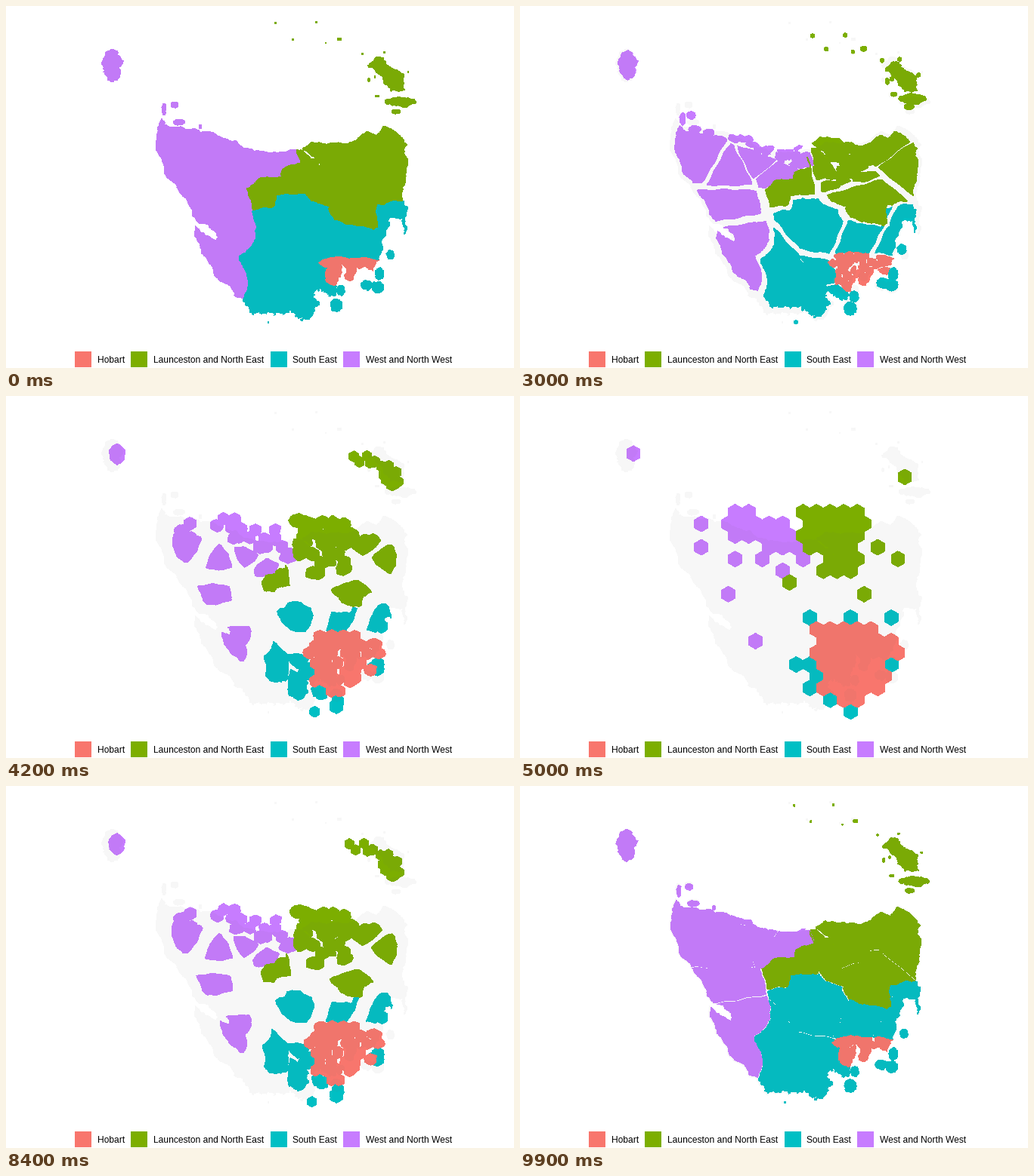
A matplotlib script for the animation above (10 s loop, 672 px wide and 480 px high).

```python
import numpy as np
import matplotlib.pyplot as plt
from matplotlib.animation import FuncAnimation
from matplotlib.patches import PathPatch, Rectangle
from matplotlib.path import Path

W, H, DPI = 672, 480, 96
STEP = 17.95                    # hexagon width
ROW = STEP * np.sqrt(3) / 2
RED, GREEN, TEAL, PURPLE = range(4)
LEGEND = [("Hobart", "#F8766D", 91, 121),
          ("Launceston and North East", "#7CAE00", 165, 195),
          ("South East", "#00BFC4", 350, 379),
          ("West and North West", "#C77CFF", 446, 476)]

rng = np.random.default_rng(11)


def fray(a, b, amp):
    """Ragged line from a up to, not including, b."""
    d = b - a
    size = np.hypot(*d)
    if size < 2.5:
        return [a]
    side = np.array([-d[1], d[0]]) / size
    mid = (a + b) / 2 + side * rng.normal() * min(.13 * size, 1.3) * amp
    return fray(a, mid, amp) + fray(mid, b, amp)


def rough(points, amp=.8):
    pts = np.array(points, float)
    line = [q for a, b in zip(pts, pts[1:]) for q in fray(a, b, amp)]
    return np.array(line + [pts[-1]])


def ring(*lines):
    return np.vstack([p[:-1] for p in lines])


def area(p):
    x, y = p.T
    return (x * np.roll(y, -1) - y * np.roll(x, -1)).sum() / 2


def clip(p, point, normal):
    """Part of p on the side of the line that normal points away from."""
    side = (p - point) @ normal
    out = []
    for i in range(len(p)):
        j = (i + 1) % len(p)
        if side[i] <= 0:
            out.append(p[i])
        if side[i] * side[j] < 0:
            out.append(p[i] + (p[j] - p[i]) * side[i] / (side[i] - side[j]))
    return np.array(out).reshape(-1, 2)


def cut(p, x1, y1, x2, y2):
    """Parts of p to the left and to the right of a directed line."""
    normal = np.array([y1 - y2, x2 - x1])
    return clip(p, (x1, y1), normal), clip(p, (x1, y1), -normal)


def densify(p, count=78):
    nxt = np.roll(p, -1, axis=0)
    sizes = np.hypot(*(nxt - p).T)
    limit = sizes.sum() / count
    out = []
    for a, b, size in zip(p, nxt, sizes):
        n = max(1, int(np.ceil(size / limit)))
        out += [a + (b - a) * i / n for i in range(n)]
    return np.array(out)


def hex_centre(col, row):
    return np.array([150 + STEP * (col + (row % 2 == 0) / 2), 154 + ROW * row])


ANGLE = np.radians(np.arange(7) * 60 + 30)
CORNERS = np.c_[np.cos(ANGLE), np.sin(ANGLE)] * STEP / np.sqrt(3)


def on_hex(t):
    t = t % 1 * 6
    return np.c_[np.interp(t, range(7), CORNERS[:, 0]),
                 np.interp(t, range(7), CORNERS[:, 1])]


def morph(p, centre, wave=1.0):
    """Outline on the map and the matching outline of its hexagon."""
    if area(p) < 0:
        p = p[::-1]
    p = densify(p)
    p = p + wave * np.sin(p[:, ::-1] / (4.5, 5.5))      # bends straight borders
    sizes = np.hypot(*(np.roll(p, -1, axis=0) - p).T)
    t = np.r_[0, np.cumsum(sizes)[:-1]] / sizes.sum()
    flat = p - p.mean(axis=0)
    turns = np.linspace(0, 1, 72, endpoint=False)
    best = min(turns, key=lambda s: ((flat - on_hex(t + s)) ** 2).sum())
    return p, on_hex(t + best) + centre


def scatter(p, count, focus, spread):
    shape, seeds = Path(p), []
    while len(seeds) < count:
        tries = rng.normal(focus, spread, (40, 2))
        tries = tries[shape.contains_points(tries)][:4]
        if len(tries):
            gap = [min([np.hypot(*(q - s)) for s in seeds], default=0) for q in tries]
            seeds.append(tries[int(np.argmax(gap))])
    return np.array(seeds)


def pair_up(seeds, goals):
    """Give each seed a goal at about the same relative place."""
    a, b = ((q - q.mean(axis=0)) / q.std(axis=0) for q in (seeds, goals))
    far = np.hypot(*(a[:, None] - b[None]).transpose(2, 0, 1))
    chosen = {}
    for k in np.argsort(far, axis=None):
        i, j = divmod(int(k), len(goals))
        if i not in chosen and j not in chosen.values():
            chosen[i] = j
    return [goals[chosen[i]] for i in range(len(seeds))]


groups = [[] for _ in LEGEND]


def add(region, p, col, row, wave=1.0):
    groups[region].append(morph(p, hex_centre(col, row), wave))


def add_crowd(region, p, rows, focus, spread):
    """Split p into one small cell for each hexagon in rows."""
    goals = np.array([hex_centre(c, r) for r, (lo, hi) in rows.items()
                      for c in range(lo, hi + 1)])
    seeds = scatter(p, len(goals), focus, spread)
    for s, goal in zip(seeds, pair_up(seeds, goals)):
        cell = p
        for o in seeds:
            if o is not s and (o != s).any():
                cell = clip(cell, (s + o) / 2, o - s)
        groups[region].append(morph(cell, goal))


def add_isle(region, col, row, x, y, rx, ry):
    a = np.linspace(0, 2 * np.pi, 13)
    p = np.c_[x + rx * np.cos(a), y + ry * np.sin(a)]
    add(region, rough(p, 1.3)[:-1] if rx > 2 else p[:-1], col, row, 0)


# coasts and the borders between regions
west_coast = rough([(315, 388), (304, 386), (296, 372), (276, 356), (262, 330), (250, 302),
                    (250, 291), (263, 302), (278, 311), (282, 306), (266, 290), (255, 288),
                    (245, 268), (226, 241), (211, 222), (198, 182), (205, 150), (210, 157),
                    (235, 162), (272, 168), (304, 180), (338, 194), (372, 194), (385, 190)])
north_coast = rough([(385, 190), (391, 190), (424, 220), (404, 200), (393, 188), (405, 181),
                     (452, 182), (478, 167), (490, 171), (500, 159), (515, 167), (530, 183),
                     (527, 195), (531, 210), (524, 257)], .7)
east_coast = rough([(524, 257), (531, 268), (528, 302), (524, 280), (507, 282),
                    (497, 318), (494, 336)], 1.4)
south_coast = rough([(428, 368), (436, 385), (414, 373), (408, 405), (402, 416),
                     (371, 407), (327, 409), (315, 388)], 2)
bay = rough([(494, 336), (485, 351), (462, 345), (460, 362), (450, 362), (450, 347),
             (441, 342), (443, 352), (433, 371), (428, 368)], 1.1)
purple_green = rough([(385, 190), (389, 207), (366, 217), (365, 227), (341, 228),
                      (319, 241), (327, 270)], .6)
purple_teal = rough([(327, 270), (332, 308), (309, 337), (320, 358), (315, 388)], .6)
green_teal = rough([(327, 270), (353, 265), (358, 250), (397, 248), (403, 259), (425, 264),
                    (435, 284), (486, 296), (491, 292), (489, 262), (524, 257)], .6)
teal_red = rough([(494, 336), (438, 333), (419, 336), (413, 341), (425, 346),
                  (424, 364), (428, 368)], .6)

# west and north west
north, south = cut(ring(west_coast, purple_green, purple_teal), 226, 241, 319, 241)
upper, lower = cut(south, 266, 287, 325, 277)
add(PURPLE, upper, 7, 7)
add(PURPLE, lower, 9, 11)
tip, north = cut(north, 240, 241, 280, 171)
add(PURPLE, tip, 5, 3)
strip, north = cut(north, 284, 180, 352, 207)
strip, end = cut(strip, 354, 206, 374, 194)
add(PURPLE, end, 12, 4)
add_crowd(PURPLE, strip, {0: (7, 8), 1: (7, 11), 2: (7, 11), 3: (10, 12)},
          (328, 190), (36, 12))
left, north = cut(north, 310, 240, 291, 200)
add(PURPLE, left, 7, 4)
upper, lower = cut(north, 310, 226, 338, 204)
add(PURPLE, upper, 9, 4)
add(PURPLE, lower, 11, 5)

# north east
left, rest = cut(ring(north_coast, green_teal[::-1], purple_green[::-1]),
                 397, 249, 389, 207)
add(GREEN, left, 11, 6)
upper, lower = cut(rest, 436, 186, 524, 257)
left, right = cut(upper, 473, 212, 524, 174)
add(GREEN, left, 18, 3)
add(GREEN, right, 19, 4)
town, plain = cut(lower, 397, 249, 477, 226)
add(GREEN, plain, 17, 7)
right, left = cut(town, 392, 189, 424, 220)
add_crowd(GREEN, left, {2: (12, 13), 3: (13, 14), 4: (14, 14), 5: (14, 15)},
          (408, 225), (15, 14))
head, right = cut(right, 404, 200, 436, 191)
add(GREEN, head, 12, 0)
add_crowd(GREEN, right, {0: (13, 16), 1: (13, 17), 2: (14, 16), 3: (15, 16),
                         4: (15, 16), 5: (16, 16)}, (432, 212), (17, 12))

# south east
low, rest = cut(ring(green_teal, east_coast, teal_red, south_coast, purple_teal[::-1]),
                369, 327, 327, 280)
left, right = cut(low, 371, 406, 371, 330)
add(TEAL, left, 12, 13)
add(TEAL, right, 13, 15)
top, low = cut(rest, 369, 327, 418, 335)
left, top = cut(top, 416, 332, 435, 285)
add(TEAL, left, 13, 9)
left, right = cut(top, 468, 334, 486, 296)
add(TEAL, left, 16, 9)
add(TEAL, right, 19, 9)
upper, low = cut(low, 390, 352, 413, 338)
add(TEAL, upper, 13, 13)
upper, lower = cut(low, 405, 368, 424, 362)
add(TEAL, upper, 13, 14)
add(TEAL, lower, 14, 16)

add_crowd(RED, ring(bay, teal_red[::-1]),
          {10: (13, 17), 11: (14, 19), 12: (13, 19), 13: (14, 18), 14: (14, 18),
           15: (14, 18), 16: (15, 16)}, (440, 347), (26, 16))

# islands
add_isle(PURPLE, 0, -5, 141, 79, 12, 22)
add_isle(PURPLE, 5, 1, 251, 169, 6, 5)
for x, y, rx, ry in [(209, 137, 2.5, 8), (223, 131, 5, 4), (229, 154, 8, 3.5),
                     (257, 160, 2, 3)]:
    add_isle(PURPLE, 5, 3, x, y, rx, ry)

big = rough([(489, 67), (496, 68), (512, 84), (526, 90), (528, 111), (509, 114),
             (494, 90), (480, 82), (489, 67)], 1.3)
add(GREEN, big[:-1], 20, -3)
for x, y, rx, ry in [(522, 127, 21, 6), (516, 140, 6, 3), (441, 44, 3, 2),
                     (491, 119.5, 3, 1.2), (480, 98, 1.2, 3), (488, 94, 1, 1.5)]:
    add_isle(GREEN, 20, -3, x, y, rx, ry)
for x, y in [(356.5, 22.5), (379.5, 44.5), (410.5, 21.5), (471.5, 63.5),
             (500.5, 61.5), (532, 87.5)]:
    add_isle(GREEN, 20, -3, x, y, .9, .9)
add_isle(GREEN, 20, -3, 423, 49, .4, .4)

add_isle(TEAL, 19, 9, 508.5, 330, 5, 6)
for x, y, rx, ry in [(443, 377, 5, 7), (437, 397, 8, 9), (347, 419.5, .8, .8)]:
    add_isle(TEAL, 16, 17, x, y, rx, ry)
for x, y, rx, ry in [(494, 355, 6, 8), (492, 373, 8, 8), (477, 370, 8, 6)]:
    add_isle(TEAL, 19, 13, x, y, rx, ry)


def compound(pairs):
    """Vertices at both ends of the change, and the path codes."""
    start, end = (np.vstack([np.vstack([q[k], q[k][:1]]) for q in pairs]) for k in (0, 1))
    codes = [c for q in pairs
             for c in [Path.MOVETO] + [Path.LINETO] * (len(q[0]) - 1) + [Path.CLOSEPOLY]]
    return start, end, codes


shapes = [compound(g) for g in groups]

fig = plt.figure(figsize=(W / DPI, H / DPI), dpi=DPI, facecolor="white")
ax = fig.add_axes([0, 0, 1, 1])
ax.set(xlim=(0, W), ylim=(H, 0))
ax.axis("off")

flat = dict(lw=0, ec="none", antialiased=False)
patches = []
for i, (label, colour, key_x, text_x) in enumerate(LEGEND):
    start, _, codes = shapes[i]
    patches.append(ax.add_patch(PathPatch(Path(start, codes), fc=colour,
                                          zorder=5 - i, **flat)))
    ax.add_patch(Rectangle((key_x, 458), 22, 21, fc=colour, **flat))
    ax.text(text_x, 473, label, family="Liberation Sans", size=9, color="black",
            va="baseline")

# faint shade of the whole land, above the coloured areas
land, _, codes = compound([q for g in groups for q in g])
ax.add_patch(PathPatch(Path(land, codes), fc="#666666", alpha=.05, zorder=8, **flat))


def draw(frame):
    p = np.interp(frame, [0, 25, 50, 75, 100], [0, 0, 1, 1, 0])
    for patch, (start, end, codes) in zip(patches, shapes):
        patch.set_path(Path(start + (end - start) * p, codes))
    return patches


anim = FuncAnimation(fig, draw, frames=100, interval=100, repeat=True, repeat_delay=0,
                     init_func=lambda: draw(0), blit=False)
plt.show()
```
